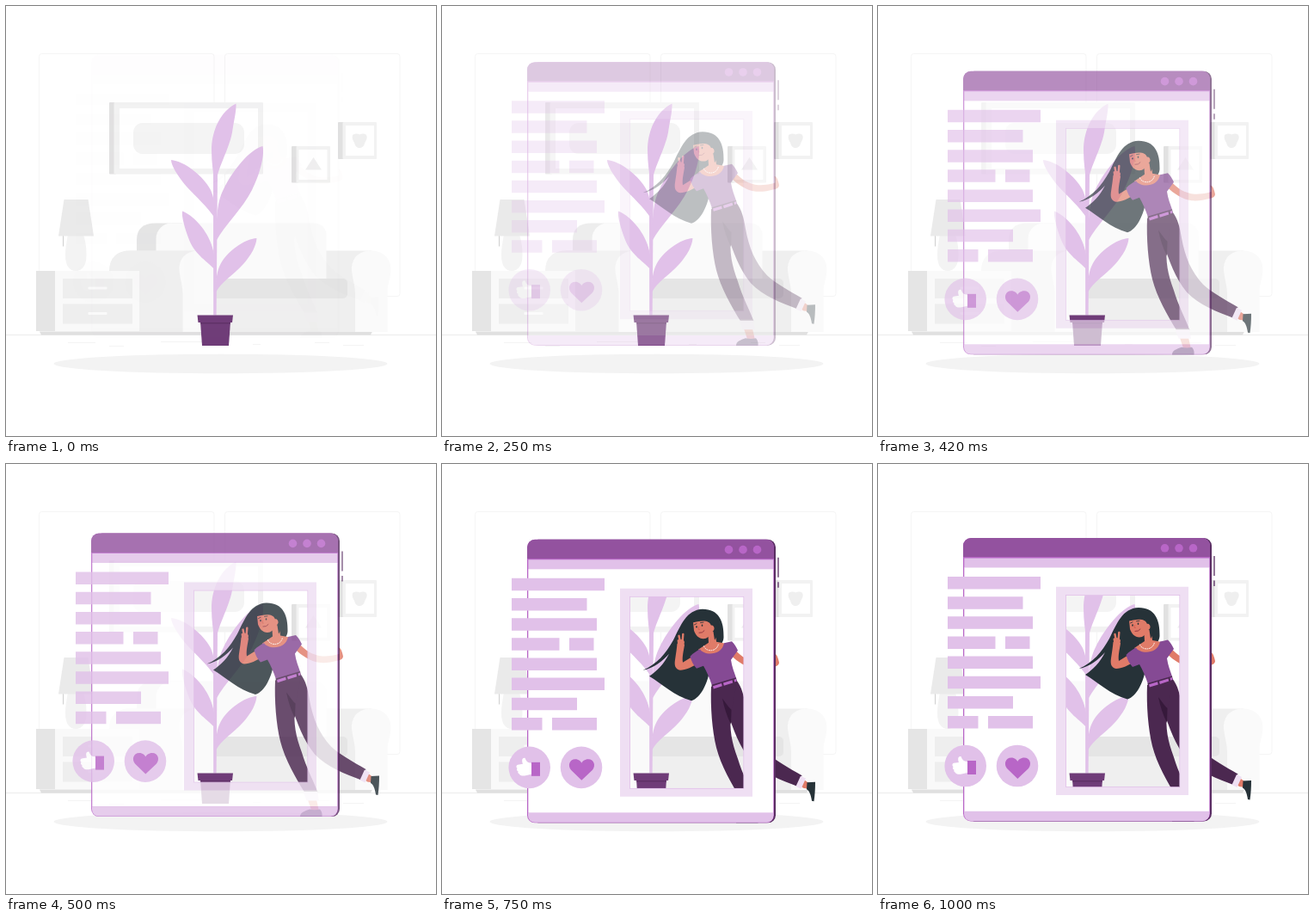
Recreate the animation shown at these times as an HTML page with a canvas. Size 500 by 500 pixels, loop 1.04 s.

```html
<!DOCTYPE html>
<html lang="en">
<head>
<meta charset="utf-8">
<title>Online presence</title>
<style>
  html, body { margin: 0; width: 100%; height: 100%; overflow: hidden; background: #fff; }
  canvas { display: block; width: 500px; height: 500px; }
</style>
</head>
<body>
<canvas id="stage" width="500" height="500"></canvas>
<script>
const SIZE = 500, LOOP = 1040, FPS = 24, DROP = 30;
const INK = {
  lilac: '#e1c1e9', pale: '#efdff3', violet: '#b866c7', header: '#93529f',
  edge: '#5a2e63', pot: '#6f3c78', potShade: '#5f3167', shirt: '#854a94',
  pants: '#4b2850', fold: '#36193b', skin: '#e07b68', blush: '#d45a50', dark: '#263238'
};

function makeLayer() {
  const c = document.createElement('canvas');
  c.width = c.height = SIZE;
  return c.getContext('2d');
}

const stage = document.getElementById('stage').getContext('2d');
const room = makeLayer(), layer = makeLayer();

function fill(g, color, d) {
  g.fillStyle = color;
  g.fill(new Path2D(d));
}

function line(g, color, width, d) {
  g.strokeStyle = color;
  g.lineWidth = width;
  g.stroke(new Path2D(d));
}

// Boxes are given by their left, top, right and bottom edges.
function box(g, color, l, t, r, b, radius = 0) {
  g.fillStyle = color;
  g.beginPath();
  g.roundRect(l, t, r - l, b - t, radius);
  g.fill();
}

function oval(g, color, x, y, rx, ry = rx) {
  g.fillStyle = color;
  g.beginPath();
  g.ellipse(x, y, rx, ry, 0, 0, Math.PI * 2);
  g.fill();
}

function picture(g, l, t, r, b, inner) {
  box(g, '#e1e1e1', l, t, l + 8, b, 1);
  box(g, '#f2f2f2', l + 5.5, t, r, b, 1);
  box(g, '#fff', ...inner);
}

function drawWall(g) {
  g.strokeStyle = '#f5f5f5';
  g.lineWidth = 1;
  for (const x of [38.5, 254.5]) {
    g.beginPath();
    g.roundRect(x, 55.5, 203.5, 282, 3);
    g.stroke();
  }
  picture(g, 120, 112, 299, 195.5, [132, 119, 293, 189]);
  box(g, '#f4f4f4', 148, 136, 277, 172, 11);
  picture(g, 332, 163, 377, 205.5, [340.5, 167, 373.5, 202]);
  fill(g, '#efefef', 'M357.5 176L367 190.5H348Z');
  picture(g, 386, 135, 431, 178, [395, 139, 428, 174]);
  fill(g, '#efefef', 'M403 150C406 148 409 148 411 149.5C414 148 417 148 419 150C421 154 418 157 417 160C416 164 413 165 411 165C408 165 406 163 405 159C403 156 402 153 403 150Z');
}

function drawFloor(g) {
  line(g, '#ececec', 1, 'M0 382.5H500');
  line(g, '#f4f4f4', 1, 'M72 391.5H104M120 395.5H137M180 390.5H230M287 393.5H296M359 391.5H376M392 394.5H416');
  fill(g, '#e0e0e0', 'M39 378.5H426L424 382.5H41Z');
  oval(g, '#f3f3f3', 249.5, 416, 194, 11.3);
}

function drawSofa(g) {
  fill(g, '#e5e5e5', 'M152 290V272Q152 252.5 174 252.5H205V290Z');
  fill(g, '#efefef', 'M120 308Q121 284.5 145 284.5H425V379H154V308Z');
  box(g, '#fafafa', 174.5, 252.5, 372.5, 318, [18, 14, 0, 0]);
  box(g, '#efefef', 222, 317, 405, 379);
  box(g, '#e5e5e5', 238, 317, 397, 340, 5);
  fill(g, '#efefef', 'M120 308Q121 284.5 145 284.5H222L206 379H154Z');
  const arm = 'M201.5 307C201 292 211 284.5 224 284.5C238 284.5 247 294 247 306C247 316 243 322 243 334V379H205.5V334C205 322 202 316 201.5 307Z';
  fill(g, '#fafafa', arm);
  g.save();
  g.translate(200.5, 0);
  fill(g, '#fafafa', arm);
  g.restore();
}

function drawNightstand(g) {
  box(g, '#f9f9f9', 57, 308, 155, 378);
  box(g, '#e5e5e5', 35, 308, 57, 378);
  for (const y of [317, 346.5]) {
    box(g, '#eeeeee', 66, y, 147, y + 23);
    box(g, '#fafafa', 95.5, y + 9.5, 117.5, y + 12.5, 1);
  }
  line(g, '#cfcfcf', 1, 'M66.5 266V279.5');
  fill(g, '#f3f3f3', 'M72 266H90C93 276 93.500 282 93.500 290C93.500 302 88 308 81 308C74 308 69 302 69 290C69 282 70 276 72 266Z');
  fill(g, '#eaeaea', 'M67.500 225H95.500L102 267.500H61Z');
}

function drawPlant(g) {
  [
    'M241.200 359.500L241 194H246L244.600 359.500Z',
    'M267.500 113.500C250 122 239 144 239 168C239 182 241 194 242.500 206H244.500C245 190 259 168 263 147C265 133 268 122 267.500 113.500Z',
    'M298.500 163C284 166 263 192 253 213C247 225 244.500 238 244.500 273C254 255 275 236 286 214C295 196 301 174 298.500 163Z',
    'M192 179C207 180 230 198 238 214C242 223 243 232 243 247C235 234 221 222 210 210C199 197 192 185 192 179Z',
    'M205 238.500C217 243 232 259 238 275C242 285 243 294 243 307C236 298 220 290 213 272C208 259 204 245 205 238.500Z',
    'M291.500 270C277 271 258 285 250 299C245 308 244 318 244 333C250 321 263 314 276 300C285 290 291 279 291.500 270Z'
  ].forEach(d => fill(g, INK.lilac, d));
  fill(g, INK.pot, 'M226 367H261L259 395H228Z');
  fill(g, INK.potShade, 'M226 367H261L260.800 369.500H226.200Z');
  fill(g, INK.pot, 'M222.500 359.500H264L263 368H223.500Z');
}

function drawWoman(g) {
  g.lineCap = 'round';
  g.lineJoin = 'round';
  // hair behind the body
  fill(g, INK.dark, 'M303 167C284 168 278 185 269 203C260 219 250 231 233.500 238C246 236 257 227 264 219C258 231 250 239 241 245C256 254 270 268 290 273.500C301 270 308 254 311 240L318 210C324 210 327 206 327.500 200C328 181 322 167 303 167Z');
  // far arm
  fill(g, INK.skin, 'M341 214C347 222 357 228 368 229C376 229 384 228 387.500 226L386.500 219C389 218 391 224 392 229C392 232 389 233.500 386 234C379 236 372 237 365 236.500C353 235 344 228 336 221Z');
  // far leg and foot
  fill(g, INK.skin, 'M418 363L426 369V376L420 375L415 371Z');
  fill(g, INK.dark, 'M424.500 368.500L434 368C434 376 433.500 384 432.500 390.500L430 390C429 383 427 378 424 376.500Z');
  fill(g, INK.pants, 'M322 254L342 249C349 258 351 268 353 280C357 302 364 319 378 334C389 344 404 352 418.500 360.500L413 373C395 366 373 358 359 343C346 327 338 306 332 286Z');
  fill(g, INK.pale, 'M417 361L423 364L417.500 376L411.500 373Z');
  // near leg and foot
  fill(g, INK.skin, 'M351 396H361L364 409L355 408Z');
  fill(g, INK.dark, 'M342 415.500C342 411 347 409 353 407C357 408 361 408 365 407C367 409 368 412 367.500 415.500Z');
  fill(g, INK.pants, 'M313 257L342 249C342 262 339 274 336 287C334 308 337 322 344 341C349 358 357 373 362.500 387H347C337 371 324 348 319 328C314 308 312 280 313 257Z');
  fill(g, INK.pale, 'M345.500 386.500H362L364 397H349.500Z');
  fill(g, INK.fold, 'M326 271C328 281 331 291 336 301L336.500 284C333 281 330 276 326 271Z');
  // neck and raised arm
  fill(g, INK.skin, 'M309 190L318 194L319 205L330 207L326 220L306 222L298 214L310 206Z');
  fill(g, INK.skin, 'M273.500 207L282 208C281 216 279 222 280 229L293 221L299 229C292 234 283 238 277 238C271 237 270 232 271 226C272 219 273 213 273.500 207Z');
  fill(g, INK.skin, 'M273.500 203C276 201 281 202 282 205L281 211H274.500Z');
  line(g, INK.skin, 2.4, 'M275.500 198L277 206M280.300 196L279.500 206');
  // top and belt
  fill(g, INK.shirt, 'M300 213.500C304 221 325 222 328 206.500L337 204.500C340 207 342 211 344 215L336 226C337 234 340 241 342 247L314 256C311 247 308 240 304 233L296 236C292 232 290 227 288.500 222C292 218 296 216 300 213.500Z');
  fill(g, INK.pants, 'M313.500 255L342 246.500L342.800 251L314.500 260Z');
  fill(g, INK.violet, 'M315 256.300L325 253.200L325.800 256.500L315.800 259.600ZM327 252.700L337.500 249.400L338.200 252.600L327.800 256ZM339.500 248.800L342 248L342.600 250.800L340.200 251.700Z');
  g.setLineDash([1, 1.6]);
  line(g, '#fff', 1, 'M304.500 210C307 217 320 217 321.500 207');
  g.setLineDash([]);
  // face
  fill(g, INK.skin, 'M292 182C296 177 310 177 314 184C317 182 318 187 315 191C313 195 311 199 307 201C300 203 295 198 293 192Z');
  fill(g, INK.dark, 'M290 183C292 173 306 168 316 173C323 178 323 196 317 203L315 190C316 187 315 185 313 186C310 178 299 181 290 183Z');
  fill(g, INK.skin, 'M312 188C313 185 317 186 316.500 190C316 193 313 194 312 192Z');
  oval(g, INK.dark, 296, 187.500, 0.8, 1.2);
  oval(g, INK.dark, 302.500, 185.800, 0.8, 1.2);
  line(g, INK.dark, 0.8, 'M293.500 185L296 183.800M300.500 182.800L304 182.300');
  line(g, INK.blush, 0.8, 'M298.500 187.500L298 190.500L299.500 190.500');
  line(g, '#8e2f3b', 0.9, 'M299 194.500Q303 195 305 192');
}

function drawWindow(g) {
  box(g, INK.edge, 103, 86, 388, 415.500, 9);
  box(g, INK.violet, 99, 86, 386, 415.500, 9);
  g.save();
  g.beginPath();
  g.roundRect(99, 86, 287, 329.500, 9);
  g.clip();
  box(g, INK.header, 99, 86, 386, 108.300);
  box(g, INK.violet, 99, 108.300, 386, 109.500);
  box(g, INK.lilac, 100.300, 109.500, 385.300, 121);
  box(g, '#fff', 100.300, 120.500, 385.300, 404);
  box(g, INK.lilac, 100, 403.800, 385.500, 415, [0, 0, 8, 8]);
  g.restore();
  for (const x of [333.500, 350, 366.500]) oval(g, INK.violet, x, 97.800, 4.800);

  // photo frame with an open middle
  box(g, INK.pale, 207, 142.800, 361, 385);
  g.clearRect(218.500, 152.500, 132.500, 223);
  g.strokeStyle = INK.lilac;
  g.lineWidth = 0.8;
  g.strokeRect(218.500, 152.500, 132.300, 223);
  g.lineCap = 'butt';
  line(g, INK.edge, 1.3, 'M391 107V130M391 135.500V142');
}

function drawPost(g) {
  const rows = [[189], [168.500], [180], [136.500, 148, 176.500], [180], [189], [157], [116.500, 128, 180]];
  rows.forEach(([end, l, r], i) => {
    const y = 131 + i * 23.150;
    box(g, INK.lilac, 81, y, end, y + 14.500);
    if (l) box(g, INK.lilac, l, y, r, y + 14.500);
  });
  oval(g, INK.lilac, 101.700, 351, 24.300);
  oval(g, INK.lilac, 162, 351, 24.300);
  box(g, INK.violet, 104, 345, 114, 361);
  fill(g, '#fff', 'M104 346C99.500 346 97.500 343 96.500 340C93 339.500 92.500 343 94 347L88 347.800C86 348.500 86 351 87.500 352C86.500 354 87 355 88.500 355.500C88 357 88.500 358.500 90 358.700C90.500 360.500 93 361 96 360.700L104 359Z');
  fill(g, INK.violet, 'M162.300 366L150 354C146 349 148 341.500 155 341.500C159 341.500 161.500 344 162.300 346C163 344 166 341.500 170 341.500C177 341.500 179 349 175 354Z');
}

// y of cubic-bezier(.36, -.01, .5, 1.38) at x
function ease(x) {
  const curve = (s, a, b) => 3 * (1 - s) * s * ((1 - s) * a + s * b) + s ** 3;
  let lo = 0, hi = 1;
  for (let i = 0; i < 40; i++) {
    const mid = (lo + hi) / 2;
    if (curve(mid, 0.36, 0.5) < x) lo = mid; else hi = mid;
  }
  return curve(hi, -0.01, 1.38);
}

// The motion ticks at 24 steps a second, on a 10 ms clock.
function progress(ms) {
  const tickStart = k => Math.round(k * 100 / FPS) * 10;
  let k = 0;
  while (k < FPS && tickStart(k + 1) <= ms) k++;
  return ease(Math.min(1, (k + 1) / FPS));
}

function show(draw, p) {
  layer.clearRect(0, 0, SIZE, SIZE);
  layer.save();
  layer.translate(0, (p - 1) * DROP);
  draw(layer);
  layer.restore();
  stage.globalAlpha = Math.max(0, Math.min(1, p));
  stage.drawImage(layer.canvas, 0, 0);
  stage.globalAlpha = 1;
}

function render(ms) {
  const p = progress(ms);
  stage.drawImage(room.canvas, 0, 0);
  for (const draw of [drawWoman, drawWindow, drawPost]) show(draw, p);
}

box(room, '#fff', 0, 0, SIZE, SIZE);
for (const draw of [drawWall, drawFloor, drawSofa, drawNightstand, drawPlant]) draw(room);

const start = performance.now();
function tick() {
  render((performance.now() - start) % LOOP);
  requestAnimationFrame(tick);
}
tick();
</script>
</body>
</html>
```
